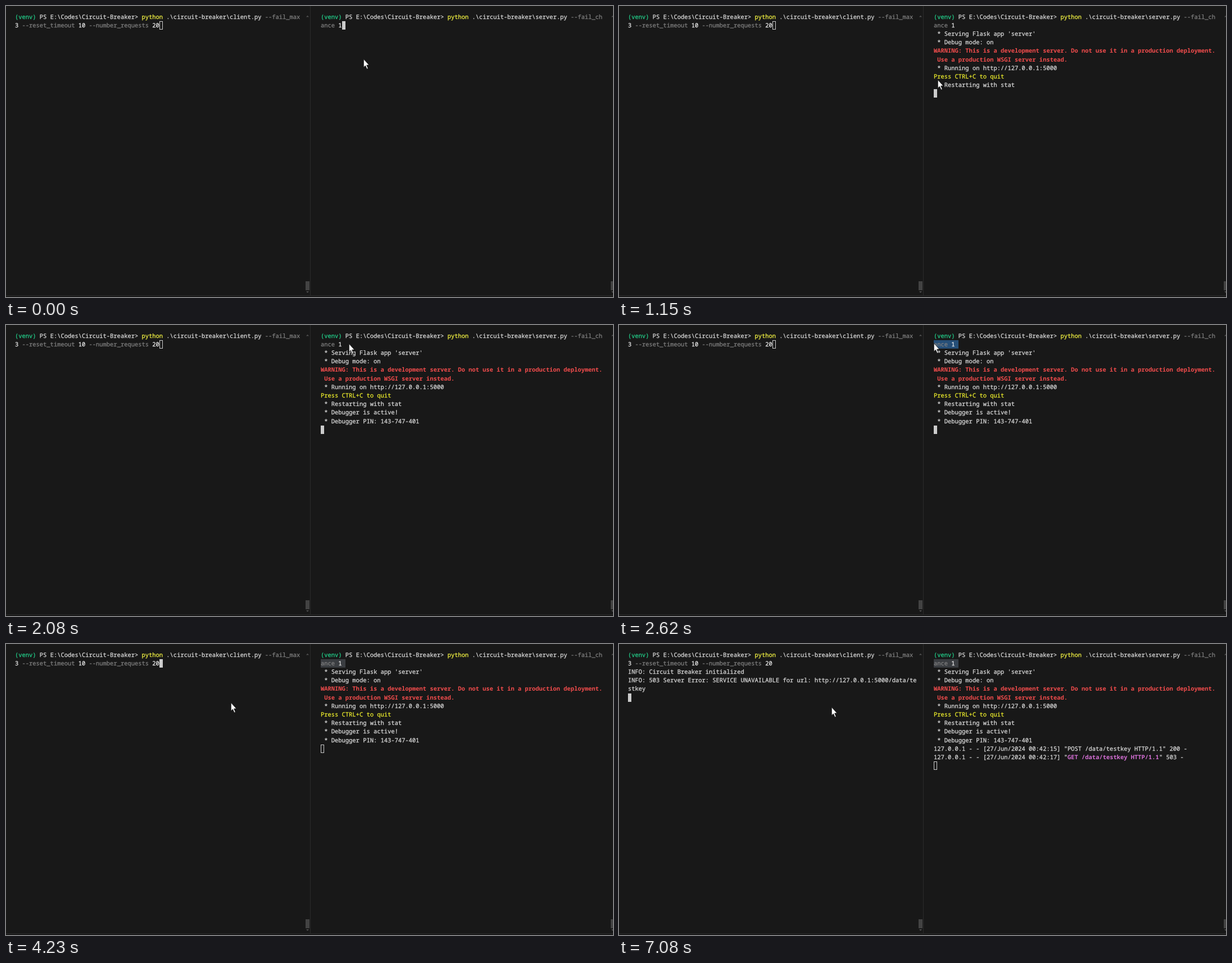
Recreate the animation shown at these times as an HTML page. Size 1080 by 518 pixels, loop 8000 ms.

```html
<!DOCTYPE html>
<html lang="en">
<head>
<meta charset="utf-8">
<title>Circuit breaker demo</title>
<style>
  html, body { margin: 0; width: 100%; height: 100%; overflow: hidden; background: #181818; }
  #stage { position: relative; width: 1080px; height: 518px; overflow: hidden; background: #181818; }
  #stage div, #stage svg { position: absolute; }
  .run {
    white-space: pre; color: #dcdcdc; line-height: 15.2px; margin-top: 1px;
    font-family: "Noto Sans Mono", "DejaVu Sans Mono", monospace; font-size: 10.44px;
    font-variant-ligatures: none; text-rendering: geometricPrecision;
    -webkit-text-stroke: .25px currentColor;
  }
  .g { color: #23d18b; }
  .y { color: #f5f543; }
  .p { color: #eeee2c; }
  .d { color: #808080; }
  .w { color: #f0f0f0; }
  .r { color: #f14c4c; }
  .m { color: #d670d6; }
  .r, .m { font-weight: bold; -webkit-text-stroke-width: 0; }
  .caret { width: 6.3px; height: 15.2px; box-sizing: border-box; border: 1px solid #cccccc; }
  .caret.focus { background: #cccccc; }
  .thumb { width: 7px; height: 16px; top: 490px; background: #434343; }
  .line { background: #2b2b2b; }
</style>
</head>
<body>
<div id="stage">
  <div class="line" style="left:541px;top:0;width:1px;height:515px"></div>
  <div class="line" style="left:0;top:515px;width:1080px;height:1px"></div>
  <div id="selection"></div>
</div>
<script>
const LOOP = 8000, TICK = LOOP / 104;
const CELL = 6.264, LINE = 15.2, TOP = 11.5;
const LEFT = 16, RIGHT = 560;
const FOCUS_SWAP = 3850;
const stage = document.getElementById('stage');
const selection = document.getElementById('selection');

// Rows: [time shown, row, text]; {c:...} sets a colour class.
const prompt = String.raw`{g:(venv)} PS E:\Codes\Circuit-Breaker> {y:python} .\circuit-breaker`;
const clientRows = [
  [0, 0, prompt + String.raw`\client.py {d:--fail_max}`],
  [0, 1, '{w:3} {d:--reset_timeout} {w:10} {d:--number_requests} {w:20}'],
  [5080, 2, 'INFO: Circuit Breaker initialized'],
  [7080, 3, 'INFO: 503 Server Error: SERVICE UNAVAILABLE for url: http://127.0.0.1:5000/data/te'],
  [7080, 4, 'stkey']
];
const serverRows = [
  [0, 0, prompt + String.raw`\server.py {d:--fail_ch}`],
  [0, 1, '{d:ance} {w:1}'],
  [1080, 2, " * Serving Flask app 'server'"],
  [1080, 3, ' * Debug mode: on'],
  [1080, 4, '{r:WARNING: This is a development server. Do not use it in a production deployment.}'],
  [1080, 5, '{r: Use a production WSGI server instead.}'],
  [1080, 6, ' * Running on http://127.0.0.1:5000'],
  [1080, 7, '{p:Press CTRL+C to quit}'],
  [1150, 8, ' * Restarting with stat'],
  [1460, 9, ' * Debugger is active!'],
  [1460, 10, ' * Debugger PIN: 143-747-401'],
  [5150, 11, '127.0.0.1 - - [27/Jun/2024 00:42:15] "POST /data/testkey HTTP/1.1" 200 -'],
  [7080, 12, '127.0.0.1 - - [27/Jun/2024 00:42:17] "{m:GET /data/testkey HTTP/1.1}" 503 -']
];

// Carets: [time, column, row]
const clientCaret = [[0, 41, 1], [4690, 0, 2], [5080, 0, 3], [7080, 0, 5]];
const serverCaret = [[0, 6, 1], [920, 0, 2], [1080, 0, 8], [1150, 0, 9], [1460, 0, 11], [5150, 0, 12], [7080, 0, 13]];

// Pointer tip: [time, x, y]
const pointerPath = [
  [0, 636, 94], [150, 636, 85], [850, 636, 85], [1150, 567, 131], [1540, 357, 203],
  [1690, 357, 203], [2080, 610, 33], [2300, 610, 33], [2380, 604, 33], [2620, 560, 32],
  [2770, 560, 32], [3230, 457, 95], [3310, 457, 95], [3690, 401, 103], [4150, 401, 103],
  [4230, 400, 104], [4380, 378, 112], [LOOP, 378, 112]
];

function addDiv(className, left, top) {
  const el = document.createElement('div');
  el.className = className;
  el.style.left = left + 'px';
  if (top !== undefined) el.style.top = top + 'px';
  return stage.appendChild(el);
}

function addSvg(x, y, w, h, points, style) {
  stage.insertAdjacentHTML('beforeend',
    `<svg width="${w}" height="${h}" style="left:${x}px;top:${y}px;overflow:visible"><polygon points="${points}" ${style}/></svg>`);
  return stage.lastElementChild;
}

const timedRuns = [];
function addRows(origin, rows) {
  for (const [start, row, markup] of rows) {
    let col = 0;
    for (const [, color, tinted, plain] of markup.matchAll(/\{(\w):([^}]*)\}|([^{]+)/g)) {
      const text = tinted ?? plain;
      const el = addDiv('run ' + (color || ''), origin + col * CELL, TOP + row * LINE);
      el.textContent = text;
      timedRuns.push({ el, start });
      col += text.length;
    }
  }
}

function addScrollbar(x) {
  addDiv('thumb', x);
  addSvg(x + 1, 17, 5, 3, '0,2.5 2.5,0 5,2.5', 'fill="#555"');
  addSvg(x + 1, 508, 5, 3, '0,0 2.5,2.5 5,0', 'fill="#555"');
}

addRows(LEFT, clientRows);
addRows(RIGHT, serverRows);
addScrollbar(533);
addScrollbar(1076);
const carets = [
  { el: addDiv('caret', 0, 0), origin: LEFT, steps: clientCaret },
  { el: addDiv('caret', 0, 0), origin: RIGHT, steps: serverCaret }
];
const pointer = addSvg(0, 0, 11, 19, '.3,.5 .3,15.2 3.4,12.2 6.2,18.2 8.3,17.3 5.7,11.3 9.9,10.9',
  'fill="#fff" stroke="#111" stroke-width=".8"');

function pointerAt(t) {
  const i = Math.max(1, pointerPath.findIndex(p => p[0] >= t));
  const [t0, x0, y0] = pointerPath[i - 1], [t1, x1, y1] = pointerPath[i];
  const k = (t - t0) / (t1 - t0);
  return [x0 + (x1 - x0) * k, y0 + (y1 - y0) * k];
}

function drawSelection(t, x) {
  const dragCol = Math.round((x - RIGHT) / CELL);
  const from = t >= 2620 ? 0 : t >= 2380 ? Math.min(7, Math.max(0, dragCol)) : 7;
  selection.style.cssText = `left:${RIGHT + from * CELL}px;top:${TOP + LINE}px;` +
    `width:${(7 - from) * CELL}px;height:${LINE}px;background:${t < FOCUS_SWAP ? '#264f78' : '#3a3d41'}`;
}

function render(time) {
  const t = Math.round(Math.floor((time + 5) / TICK) * TICK / 10) * 10;
  for (const { el, start } of timedRuns) el.style.visibility = t >= start ? 'visible' : 'hidden';
  carets.forEach(({ el, origin, steps }, pane) => {
    const [, col, row] = steps.findLast(s => t >= s[0]);
    el.style.left = origin + col * CELL + 'px';
    el.style.top = TOP + row * LINE + 'px';
    el.classList.toggle('focus', (pane === 0) === (t >= FOCUS_SWAP));
  });
  const [x, y] = pointerAt(t);
  pointer.style.transform = `translate(${x}px, ${y}px)`;
  drawSelection(t, x);
}

const began = performance.now();
function frame() {
  render((performance.now() - began) % LOOP);
  requestAnimationFrame(frame);
}
frame();
</script>
</body>
</html>
```
